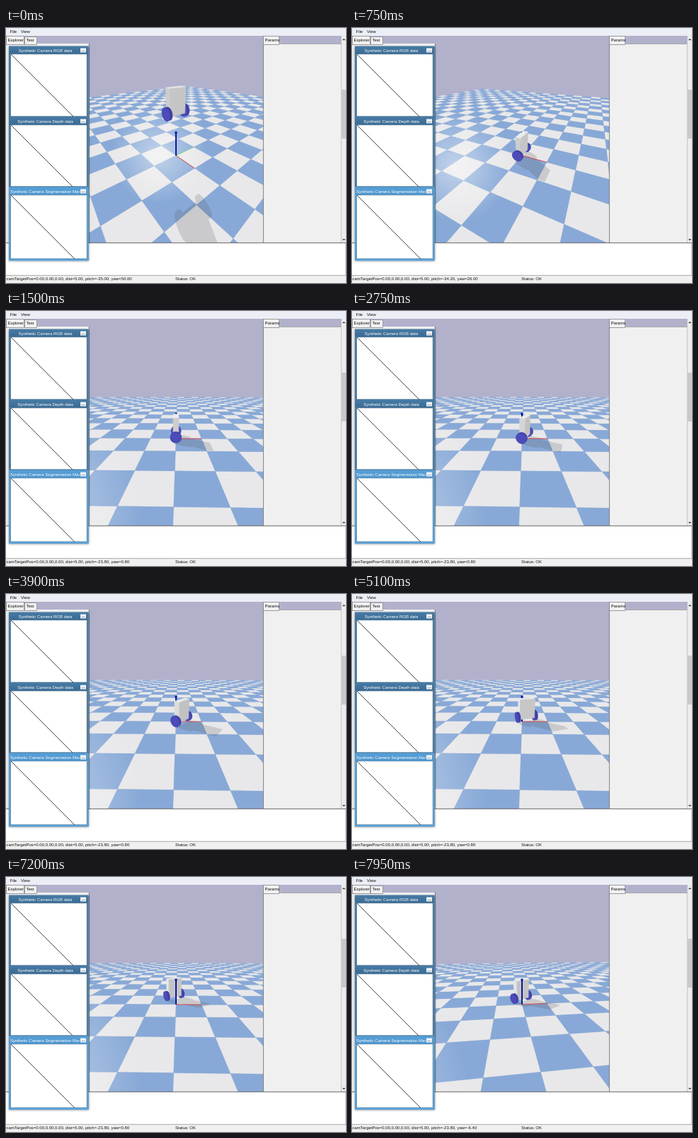
Animation, 480 px wide and 360 px high, one loop 8000 ms. Source, as an HTML page with a canvas:

```html
<!DOCTYPE html>
<html>
<head>
<meta charset="utf-8">
<style>
html, body { margin: 0; width: 100%; height: 100%; overflow: hidden; background: #fff; }
canvas { display: block; }
</style>
</head>
<body>
<canvas id="stage" width="480" height="360"></canvas>
<script>
const g = document.getElementById('stage').getContext('2d');
const LOOP = 8000, STEP = 50, FOCAL = 180, DIST = 5;
const SHADOW = [1.26, -0.74];          // ground offset per unit of height
const LIGHT = [-0.7, 0.43, 0.57];
const WHEEL_R = 0.2, BODY_BOTTOM = 0.13, BODY_TOP = 0.9;

// time, yaw, pitch
const cameraTrack = [
  [0, 50, -35], [150, 50, -35], [1050, 14, -33.8], [1450, 0.8, -23.8],
  [7700, 0.8, -23.8], [7950, -6.4, -23.8]
];
// time, x, y, heading of the wheel axis
const robotTrack = [
  [0, 0, 0, 90], [1500, 0, 0, 90], [3900, 0.22, -0.16, 51],
  [5100, 0.17, 0.06, 20], [7200, -0.09, 0.6, 30], [7950, 0.01, 0.34, 32]
];

const rad = d => d * Math.PI / 180;
const dot = (a, b) => a[0] * b[0] + a[1] * b[1] + a[2] * b[2];

function sample(track, t) {
  let i = 0;
  while (i < track.length - 2 && t > track[i + 1][0]) i++;
  const a = track[i], b = track[i + 1];
  const k = Math.min(1, (t - a[0]) / (b[0] - a[0]));
  return a.slice(1).map((v, j) => v + (b[j + 1] - v) * k);
}

// dragging the mouse turns the camera in steps of 0.2 degrees
const cameraAt = t => sample(cameraTrack, t).map(v => Math.round(v * 5) / 5);

let cam;
function setCamera(yaw, pitch) {
  const cy = Math.cos(rad(yaw)), sy = Math.sin(rad(yaw));
  const cp = Math.cos(rad(-pitch)), sp = Math.sin(rad(-pitch));
  cam = { cy, sy, cp, sp, pos: [DIST * cp * sy, -DIST * cp * cy, DIST * sp] };
}

function project([x, y, z]) {
  const right = x * cam.cy + y * cam.sy, fwd = y * cam.cy - x * cam.sy;
  const depth = DIST + fwd * cam.cp - z * cam.sp;
  const up = fwd * cam.sp + z * cam.cp;
  return [240 + FOCAL * right / depth, 180 - FOCAL * up / depth, depth];
}

function trace(points) {
  points.forEach((p, i) => i ? g.lineTo(p[0], p[1]) : g.moveTo(p[0], p[1]));
  g.closePath();
}

function polygon(points, color) {
  g.beginPath();
  trace(points);
  g.fillStyle = g.strokeStyle = color;
  g.lineWidth = 0.3;
  g.fill();
  g.stroke();
}

function hull(points) {
  const sorted = [...points].sort((a, b) => a[0] - b[0] || a[1] - b[1]);
  const half = list => {
    const out = [];
    for (const p of list) {
      while (out.length > 1) {
        const [a, b] = out.slice(-2);
        if ((b[0] - a[0]) * (p[1] - a[1]) - (b[1] - a[1]) * (p[0] - a[0]) > 0) break;
        out.pop();
      }
      out.push(p);
    }
    return out.slice(0, -1);
  };
  return half(sorted).concat(half(sorted.reverse()));
}

function line(x1, y1, x2, y2, color, width = 1) {
  g.beginPath();
  g.moveTo(x1, y1);
  g.lineTo(x2, y2);
  g.strokeStyle = color;
  g.lineWidth = width;
  g.stroke();
}

function rect(x, y, w, h, color) {
  g.fillStyle = color;
  g.fillRect(x, y, w, h);
}

function text(s, x, y, color = '#111', align = 'left') {
  g.font = '6px "Liberation Sans", Arial, sans-serif';
  g.textAlign = align;
  g.fillStyle = color;
  g.fillText(s, x, y);
}

function drawGround() {
  ['#e8e8ea', '#88a9d7'].forEach((color, parity) => {
    g.beginPath();
    for (let i = -15; i < 15; i++) {
      for (let j = -15; j < 15; j++) {
        if (Math.abs(i + j) % 2 !== parity) continue;
        const quad = [[i, j, 0], [i + 1, j, 0], [i + 1, j + 1, 0], [i, j + 1, 0]].map(project);
        if (quad.every(p => p[2] > 0.2)) trace(quad);
      }
    }
    g.fillStyle = g.strokeStyle = color;
    g.lineWidth = 0.3;
    g.fill();
    g.stroke();
  });
  // specular glare where the ground mirrors the light
  const [cx, cy, h] = cam.pos;
  const [x, y, depth] = project([cx - h * SHADOW[0], cy - h * SHADOW[1], 0]);
  const r = 1.9 * FOCAL / depth;
  const glare = g.createRadialGradient(x, y, 0, x, y, r);
  glare.addColorStop(0, 'rgba(255,255,255,.5)');
  glare.addColorStop(1, 'rgba(255,255,255,0)');
  rect(117, 80, 246, 224, glare);
}

function makeRobot(x, y, lift, heading) {
  const c = Math.cos(rad(heading)), s = Math.sin(rad(heading));
  // local frame: front, wheel axis, up
  const at = (f, u, z) => [x + f * s + u * c, y - f * c + u * s, z + lift];
  const disc = u => Array.from({ length: 24 }, (_, i) => {
    const a = i * Math.PI / 12;
    return at(WHEEL_R * Math.cos(a), u, WHEEL_R * (1 + Math.sin(a)));
  });
  const body = [];
  for (const f of [-0.1, 0.1]) {
    for (const u of [-0.3, 0.3]) {
      for (const z of [BODY_BOTTOM, BODY_TOP]) body.push(at(f, u, z));
    }
  }
  const wheels = [-1, 1].map(side => ({
    side, inner: disc(side * 0.3), outer: disc(side * 0.4), center: at(0, side * 0.35, WHEEL_R)
  }));
  return { body, wheels, axis: [c, s, 0], front: [s, -c, 0], center: at(0, 0, 0.5) };
}

function drawShadow(robot) {
  g.beginPath();
  for (const points of [robot.body, ...robot.wheels.map(w => w.inner.concat(w.outer))]) {
    trace(hull(points.map(([x, y, z]) => project([x + z * SHADOW[0], y + z * SHADOW[1], 0]))));
  }
  g.fillStyle = 'rgba(80,80,85,.2)';
  g.fill();
}

function drawBody(robot) {
  const up = [0, 0, 1];
  const faces = [
    [[0, 1, 3, 2], robot.front, -1], [[4, 5, 7, 6], robot.front, 1],
    [[0, 1, 5, 4], robot.axis, -1], [[2, 3, 7, 6], robot.axis, 1],
    [[0, 2, 6, 4], up, -1], [[1, 3, 7, 5], up, 1]
  ];
  for (const [ids, axis, sign] of faces) {
    const normal = axis.map(v => v * sign), corner = robot.body[ids[0]];
    if (dot(normal, cam.pos.map((v, i) => v - corner[i])) <= 0) continue;
    const v = Math.round(218 + 30 * dot(normal, LIGHT));
    polygon(ids.map(i => project(robot.body[i])), `rgb(${v},${v},${v})`);
  }
}

function drawWheel(wheel, robot) {
  polygon(hull(wheel.inner.concat(wheel.outer).map(project)), '#403fa6');
  const toCam = cam.pos.map((v, i) => v - wheel.center[i]);
  const cap = (dot(robot.axis, toCam) > 0) === (wheel.side > 0) ? wheel.outer : wheel.inner;
  polygon(cap.map(project), '#4c4bb8');
}

function drawRobot(robot) {
  const parts = robot.wheels.map(w => ({ depth: project(w.center)[2], draw: () => drawWheel(w, robot) }));
  parts.push({ depth: project(robot.center)[2] + 0.15, draw: () => drawBody(robot) });
  parts.sort((a, b) => b.depth - a.depth).forEach(p => p.draw());
}

function drawAxis(end, color, width) {
  const [x, y] = project(end);
  line(240, 180, x, y, color, width);
}

function drawUpAxis() {
  drawAxis([0, 0, 1], '#0a1aa0', 2);
  const y = project([0, 0, 1])[1];
  rect(238.5, y - 0.5, 3, 3, '#0715a0');
}

function drawScene(t) {
  setCamera(...cameraAt(t));
  rect(0, 0, 480, 360, '#b2b1cc');
  const [x, y, heading] = sample(robotTrack, t);
  const lift = Math.max(0, 1.48 - 4.9 * (t / 1000) ** 2);
  const robot = makeRobot(x, y, lift, heading);
  drawGround();
  drawShadow(robot);
  drawAxis([1, 0, 0], '#dc3a3a', 0.9);
  drawAxis([0, 1, 0], '#6fd070', 0.9);
  const behindOrigin = y > 0.2;
  if (!behindOrigin) drawUpAxis();
  drawRobot(robot);
  if (behindOrigin) drawUpAxis();
}

function drawWindow(title, y, height, frame, dark) {
  rect(4, y, 112.5, height, frame);
  const bar = g.createLinearGradient(0, y, 0, y + 11);
  bar.addColorStop(0, frame);
  bar.addColorStop(1, dark);
  rect(5, y + 1, 110.5, 10, bar);
  rect(7, y + 11.5, 107, height - 14.5, '#fff');
  g.strokeStyle = '#6f8797';
  g.lineWidth = 0.5;
  g.strokeRect(6.5, y + 11.5, 107.5, height - 14.5);
  g.save();
  g.beginPath();
  g.rect(6, y, 98, 12);
  g.clip();
  const wide = g.measureText(title).width > 96;
  text(title, wide ? 6 : 55.5, y + 8, '#fff', wide ? 'left' : 'center');
  g.restore();
  rect(105, y + 3, 8, 6, '#eef3f7');
  for (let i = 0; i < 3; i++) rect(106.8 + i * 1.8, y + 6.5, 1, 1, '#68798a');
  const top = y + 11.5, length = height - 14;
  line(7, top, 7 + length, top + length, '#333', 0.9);
}

function drawTab(label, x, w, top) {
  rect(x, top, w, 23 - top, '#f1f1f1');
  g.strokeStyle = '#77777f';
  g.lineWidth = 0.7;
  g.strokeRect(x + 0.5, top + 0.5, w - 1, 23 - top);
  text(label, x + 2.5, 18.5);
}

function drawInterface(t) {
  const [yaw, pitch] = cameraAt(t);
  rect(0, 0, 480, 11, '#eceef5');
  text('File', 5.5, 7);
  text('View', 21, 7);

  rect(0, 22, 117, 282, '#f0f0f0');
  line(117.3, 22, 117.3, 303, '#666', 0.8);
  drawTab('Explorer', 0, 26, 11);
  drawTab('Test', 26, 18, 12);

  rect(363, 22, 111, 282, '#f0f0f0');
  line(363.4, 11, 363.4, 303, '#666', 0.8);
  line(386, 22.5, 473, 22.5, '#777', 0.6);
  drawTab('Params', 363, 23, 11);

  rect(473, 11, 7, 292, '#ececec');
  line(473.3, 11, 473.3, 303, '#aaa', 0.6);
  rect(473.5, 87, 6.5, 69, '#c9c9c9');
  for (const [y, d] of [[16, -1], [299, 1]]) {
    polygon([[475, y - d], [479, y - d], [477, y + d]], '#444');
  }

  rect(0, 303, 480, 46, '#fff');
  line(0, 303.3, 480, 303.3, '#555', 0.9);
  line(479.6, 303, 479.6, 349, '#999', 0.6);
  rect(0, 349, 480, 11, '#f0f0f0');
  line(0, 349.3, 480, 349.3, '#888', 0.7);
  text(`camTargetPos=0.00,0.00,0.00, dist=5.00, pitch=${pitch.toFixed(2)}, yaw=${yaw.toFixed(2)}`, 0.5, 356);
  text('Status: OK', 239, 356);

  g.save();
  g.shadowColor = 'rgba(0,0,0,.4)';
  g.shadowBlur = 3;
  g.shadowOffsetY = 1;
  rect(4, 26, 112.5, 302, '#4a80aa');
  g.restore();
  drawWindow('Synthetic Camera RGB data', 25.5, 102, '#477ba5', '#3a6a93');
  drawWindow('Synthetic Camera Depth data', 125.5, 101, '#477ba5', '#3a6a93');
  drawWindow('Synthetic Camera Segmentation Mask', 224.5, 104, '#58a0d8', '#4b93cc');
}

function frame(now) {
  const t = Math.floor(now % LOOP / STEP) * STEP;
  drawScene(t);
  drawInterface(t);
  requestAnimationFrame(frame);
}
requestAnimationFrame(frame);
</script>
</body>
</html>
```
